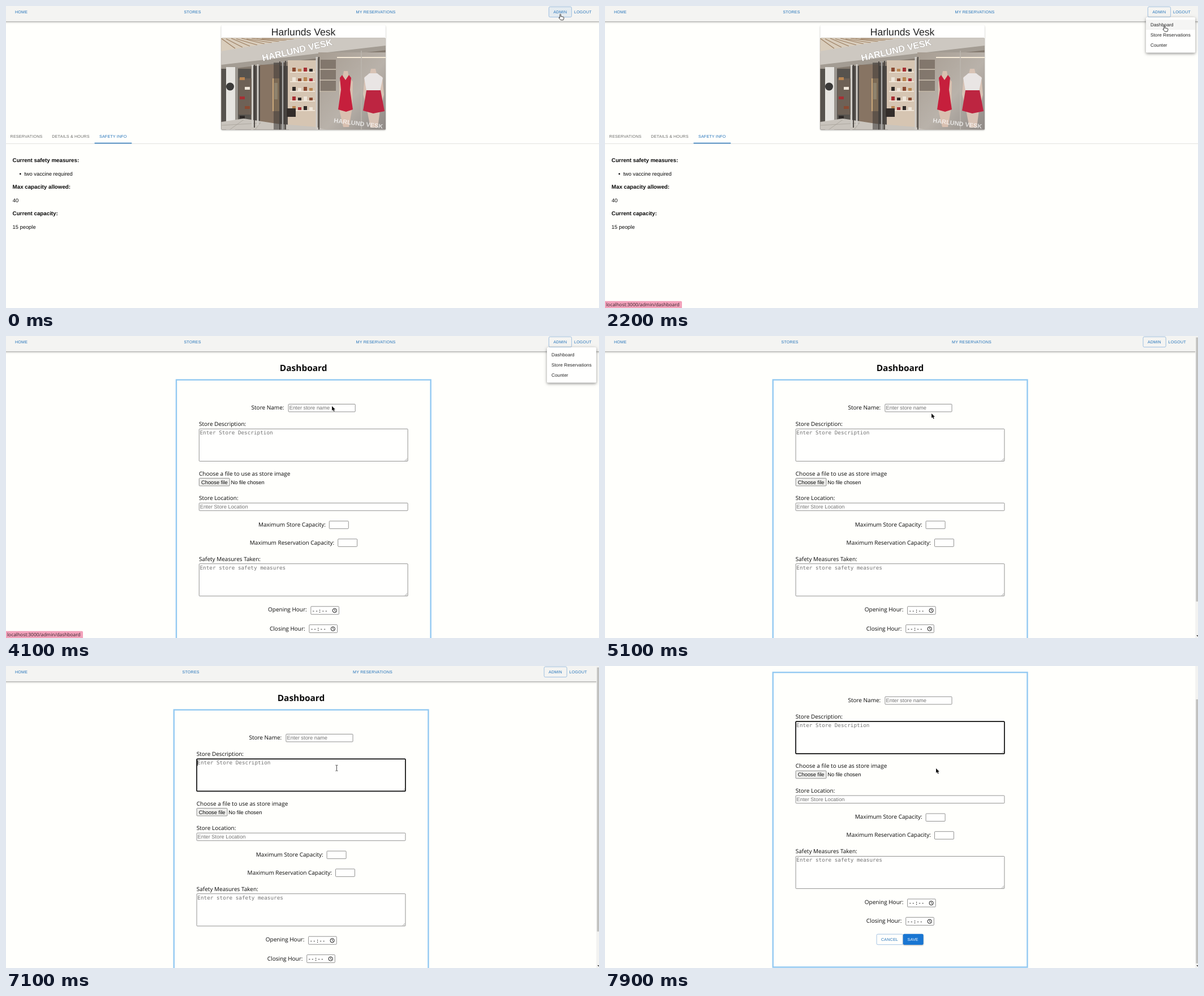
Animation, 1048 px wide and 534 px high, one loop 8000 ms. Source, as an HTML page:

```html
<!DOCTYPE html>
<html lang="en">
<head>
<meta charset="utf-8">
<title>Store admin</title>
<style>
  html, body { margin: 0; width: 100%; height: 100%; overflow: hidden; background: #fffffc; }
  svg { display: block; width: 1048px; height: 534px; }
  text { font-family: "Liberation Sans", Arial, sans-serif; text-rendering: geometricPrecision; white-space: pre; fill: #0a0a0a; }
  .btn { font-size: 7.1px; letter-spacing: .2px; fill: #2272b9; }
  .tab { fill: #6a6a68; }
  .white { fill: #fff; }
  .title { font-size: 17.6px; fill: #222; }
  .bold { font-size: 9.75px; font-weight: 700; }
  .body { font-size: 9.33px; }
  .menu { font-size: 8.19px; letter-spacing: .077px; fill: #222; }
  .head { font: 700 15.45px "Open Sans", "Noto Sans", sans-serif; }
  .label { font: 10px "Open Sans", "Noto Sans", sans-serif; }
  .status { font: 8.4px "Open Sans", "Noto Sans", sans-serif; fill: #33242a; }
  .mono { font: 9.33px "DejaVu Sans Mono", monospace; }
  .hint { fill: #757575; }
  .sign { font-size: 16px; font-weight: 700; fill: #fff; }
  .field { fill: #fffffe; stroke: #767676; stroke-width: .8px; }
  .hover { stroke: #444; }
  .focus { stroke: #0c0c0c; stroke-width: 1.7px; }
  .outline { fill: none; stroke: #8cb4dc; stroke-width: .8px; }
  .nav { filter: drop-shadow(0 1px 1px rgba(0,0,0,.28)) drop-shadow(0 1px 2px rgba(0,0,0,.18)); }
  .card { filter: drop-shadow(0 1px .8px rgba(0,0,0,.3)); }
  .paper { filter: drop-shadow(0 2px 2px rgba(0,0,0,.28)) drop-shadow(0 1px 3px rgba(0,0,0,.18)); }
</style>
</head>
<body>
<svg id="stage" viewBox="0 0 1048 534"></svg>
<script>
const LOOP = 8000, STEP = 100, NARROW = 8.4;

const text = (x, y, s, cls, extra = '') =>
  `<text x="${x}" y="${y}" class="${cls}" ${extra}>${s.replace('&', '&amp;')}</text>`;
const rect = (x, y, x2, y2, attrs) =>
  `<rect x="${x}" y="${y}" width="${x2 - x}" height="${y2 - y}" ${attrs}/>`;
const fill = c => `fill="${c}"`;
const poly = (points, c) => `<polygon points="${points}" fill="${c}"/>`;
const line = (d, c, w) => `<path d="${d}" fill="none" stroke="${c}" stroke-width="${w}"/>`;
const group = (id, body, attrs = '') => `<g id="${id}" ${attrs}>${body}</g>`;
const field = (x, y, x2, y2, id = '') =>
  rect(x, y, x2, y2, `rx="1.1" class="field" ${id && `id="${id}"`}`);

// Navigation links; the last number tells how far each follows the right edge.
function navLinks(shrink) {
  const links = [['HOME', 16, 0], ['STORES', 314.4, .34], ['MY RESERVATIONS', 618.6, .66],
    ['ADMIN', 967.4, 1], ['LOGOUT', 1004, 1]];
  return rect(959.4 - shrink, 1.4, 999.6 - shrink, 19.6, 'rx="2.2" class="outline"') +
    links.map(([s, x, k]) => text(x - k * shrink, 13.1, s, 'btn')).join('');
}

function photo() {
  let s = rect(380, 56, 671, 219, fill('#857b70'));
  s += poly('380,56 540,56 380,84', '#d9cdbc');
  for (let i = 0; i < 9; i++)
    s += line(`M${380 + i * 9} ${57 + i % 2}L${405 + i * 13} ${75 - i * 2}`, '#9a7d60', 1.1);
  s += poly('380,80 525,56 671,56 671,74 380,109', '#cdc8c1');
  s += poly('380,104 671,70 671,78 380,113', '#a39c93');

  // entrance
  s += rect(380, 111, 433, 219, fill('#57534e'));
  s += rect(389, 108, 405, 219, fill('#e6e4e0'));
  s += rect(405, 108, 410, 219, fill('#9b968f'));
  s += '<circle cx="396" cy="142.500" r="7" fill="#3b3a39"/>';
  s += rect(411, 128, 435, 192, fill('#6e6156'));
  s += rect(437, 106, 500, 219, fill('#4f4a46'));
  s += rect(449, 104, 483, 208, fill('#877463'));
  s += rect(471, 128, 484, 186, fill('#cba87b'));
  s += rect(474, 136, 480, 165, fill('#f2dcb0'));

  // shelves
  s += rect(498, 96, 548, 216, fill('#d6c5b2'));
  s += rect(560, 86, 588, 150, fill('#a0927f'));
  const goods = ['#8a4a32', '#2f2a28', '#b98552', '#efe6da', '#a62f33'];
  for (let r = 0; r < 5; r++) {
    const y = 116 + r * 17;
    s += rect(502, y, 546, y + 1.5, fill('#f6ecdf'));
    for (let k = 0; k < 4; k++)
      s += rect(506 + k * 10, y - 7 + k % 2 * 2, 512 + k * 10, y, fill(goods[(r * 3 + k * 2) % 5]));
    s += rect(413 + r % 2 * 9, y + 10, 422 + r % 2 * 9, y + 15, fill(goods[(r + 2) % 5]));
  }
  s += rect(496, 181, 512, 196, fill('#332d2a'));

  // window
  s += rect(552, 82, 671, 219, 'fill="url(#glass)"');
  s += rect(556, 95, 583, 152, 'fill="#74695e" opacity=".75"');
  s += line('M553 112H583M553 131H583M553 151H583', '#cfc3b4', 1.4);
  s += line('M585 91H671', '#f6ead6', 2);
  s += line('M628 79V219', '#bbb6ae', 1.5);

  // floor and doors
  s += poly('380,205 420,199 478,208 548,214 566,219 380,219', '#c9c4bd');
  s += line('M380 211L450 207M395 219L420 201M440 219L450 206', '#a8a29a', .8);
  s += rect(473, 100, 493, 219, 'fill="#3c3a38" opacity=".55"');
  s += line('M435.500 104V214M445 103V211M549 90V219', '#d0cdc8', 3);
  s += line('M439 104V215M484 98V219M494 97V219M553 90V219', '#46423f', 1.8);
  s += line('M489 98V219', '#aaa9a7', 2.4);

  // mannequins
  s += poly('597,115 604,115 606,125 613,134 612,180 606,214 601,214 596,214 589,183 589,134 595,125', '#d9c0b0');
  s += poly('594,122 600,131 606,122 610,127 608,148 613,183 601,187 587,183 592,148 590,127', '#c61f3c');
  s += poly('645,111 653,111 655,120 665,125 668,157 661,184 657,215 650,215 644,215 638,184 631,156 634,125 643,120', '#d8c3b5');
  s += poly('642,119 656,119 666,127 661,150 637,150 633,127', '#e9e5e4');
  s += poly('637,149 662,149 669,186 649,190 631,185', '#bd2541');

  // lettering
  s += text(454, 97.5, 'HARLUND VESK', 'sign', 'transform="rotate(-13 454 97.5)" stroke="#8f8a83" stroke-width=".5" paint-order="stroke" textLength=""');
  s += text(579, 206, 'HARLUND VESK', 'sign', 'transform="rotate(7 579 206)" style="font-size:11px" opacity=".7"');
  return s.replace(' textLength=""', '');
}

function storePage() {
  const rows = [['Current safety measures:', 'bold', 11.6, 276], ['two vaccine required', 'body', 32.2, 299.7],
    ['Max capacity allowed:', 'bold', 11.6, 323.2], ['40', 'body', 11.8, 347],
    ['Current capacity:', 'bold', 11.6, 370.4], ['15 people', 'body', 11.6, 394.4]];
  return rect(380.4, 34, 670.9, 218.7, 'rx="2" fill="#fffffe" class="card"') +
    text(525.6, 52.2, 'Harlunds Vesk', 'title', 'text-anchor="middle"') +
    `<g clip-path="url(#photoClip)">${photo()}</g>` +
    rect(0, 243, 1048, 243.8, fill('#dcdcda')) +
    rect(156.5, 241.8, 222.2, 243.2, fill('#2272b9')) +
    text(7.6, 233.1, 'RESERVATIONS', 'btn tab') +
    text(81.3, 233.1, 'DETAILS & HOURS', 'btn tab') +
    text(165, 233.1, 'SAFETY INFO', 'btn') +
    '<circle cx="25.3" cy="296.900" r="1.300"/>' +
    rows.map(([s, cls, x, y]) => text(x, y, s, cls)).join('');
}

const grip = (x, y) => line(`M${x - 5} ${y - .8}l4.2-4.2M${x - 2.600} ${y - .8}l1.800-1.800`, '#777', .6);

function timeField(x, y) {
  return field(x, y, x + 49.6, y + 14) + text(x + 1.8, y + 10.4, '--:--', 'mono') +
    `<circle cx="${x + 42}" cy="${y + 7.2}" r="3.600" fill="none" stroke="#111"/>` +
    line(`M${x + 42} ${y + 4.8}v2.600l1.800 1`, '#111', .8);
}

function dashboard() {
  const labels = [['Store Name:', 433.6, 130], ['Store Description:', 341, 159.4],
    ['Choose a file to use as store image', 341, 246.5], ['Store Location:', 341, 290.3],
    ['Maximum Store Capacity:', 446, 336.6], ['Maximum Reservation Capacity:', 430.8, 368.5],
    ['Safety Measures Taken:', 341, 397.5], ['Opening Hour:', 463, 487.4], ['Closing Hour:', 466, 520.6]];
  return text(525.7, 61.6, 'Dashboard', 'head', 'text-anchor="middle"') +
    rect(301, 77.5, 750.6, 598.7, 'fill="none" stroke="#93c9f2" stroke-width="2.4"') +
    labels.map(([s, x, y]) => text(x, y, s, 'label')).join('') +
    field(499.1, 120.5, 617.2, 134, 'nameBox') + text(500.7, 130.4, 'Enter store name', 'body hint') +
    field(341.3, 164.3, 710.1, 221.4, 'descBox') + grip(710, 221.4) +
    text(342.5, 174.2, 'Enter Store Description', 'mono hint') +
    rect(341.3, 251.5, 395.2, 265, 'rx="1.1" fill="#efefed" stroke="#767676" stroke-width=".8"') +
    text(345, 261.5, 'Choose file', 'body') + text(397.5, 261.5, 'No file chosen', 'body') +
    field(341.3, 295.3, 710.1, 308.8) + text(342.7, 305.3, 'Enter Store Location', 'body hint') +
    field(571.3, 327.2, 605.3, 340.7) + field(586.7, 358.9, 620.6, 372.4) +
    field(341.3, 402.7, 710.1, 459.8) + grip(710, 459.8) +
    text(342.5, 412.6, 'Enter store safety measures', 'mono hint') +
    timeField(538.8, 478.2) + timeField(535.9, 510.6) +
    rect(484.3, 540.4, 531, 558.9, 'rx="2.2" class="outline"') + text(492.2, 552.1, 'CANCEL', 'btn') +
    rect(531, 540, 566.9, 559.2, 'rx="2.2" fill="#1976d2" class="card"') + text(538.8, 552.1, 'SAVE', 'btn white') +
    rect(500.4, 122, 501.1, 132, 'id="nameCaret"') + rect(342.2, 166.5, 342.9, 176.5, 'id="descCaret"');
}

const menu = rect(956, 20, 1043.2, 82.6, 'rx="2.2" fill="#fffffe" class="paper"') +
  rect(956, 24.2, 1043.2, 42, 'id="row" fill="#2a2a20"') +
  text(964, 36, 'Dashboard', 'menu') + text(964, 53.8, 'Store Reservations', 'menu') + text(964, 72, 'Counter', 'menu');

const shapes = {
  hand: '<path d="M0 1.200C0-.2 1.800-.2 1.800 1.200V4.300L6 5Q7 5.300 7 6.300V8L6 10.600H1.600L-1.700 6.900Q-1.700 5.300 0 6.500Z" fill="#fff" stroke="#222" stroke-width=".9"/>',
  arrow: '<path d="M0 0V8L1.900 6.300 3.200 9.500 4.700 8.900 3.400 5.900 5.800 5.700Z" fill="#111" stroke="#fff" stroke-width=".7" paint-order="stroke"/>',
  beam: line('M-2-5h1.400l.6.500.6-.5H2M0-4.500V4.500M-2 5h1.400l.6-.5.6.5H2', '#333', .9)
};

document.getElementById('stage').innerHTML =
  `<defs><clipPath id="photoClip">${rect(380.4, 56.4, 670.9, 218.6, 'rx="1.500"')}</clipPath>
   <linearGradient id="glass" x2="1" y2="1"><stop stop-color="#a79d92"/><stop offset=".55" stop-color="#b9b2aa"/>
   <stop offset="1" stop-color="#8f8a86"/></linearGradient></defs>` +
  group('page',
    group('store', storePage()) + group('form', dashboard()) +
    rect(-10, -10, 1058, 27, 'fill="#f4f4f2" class="nav"') +
    rect(959.4, 1.4, 999.6, 19.6, 'id="tint" rx="2.2" fill="#1976d2"') +
    group('wide', navLinks(0)) + group('narrow', navLinks(NARROW))) +
  group('menu', menu) +
  group('status', '<path d="M0 521.800H134Q136 521.800 136 523.800V534H0Z" fill="#f2a1ba"/>' +
    text(2, 531, 'localhost:3000/admin/dashboard', 'status')) +
  group('bar', rect(1043.2, 0, 1048, 534, fill('#f3f3f1')) +
    rect(1044.4, 2.5, 1050, 469.5, 'id="thumb" fill="#c1c1bf"') + poly('1045,529 1049.4,529 1047.2,531.6', '#505050')) +
  Object.entries(shapes).map(([id, s]) => group(id, s)).join('');

// Pointer moves: start, end, x, y
const moves = [[800, 1200, 987.8, 34.6], [3300, 3500, 606, 131], [3700, 3900, 575, 124], [4000, 4100, 576, 124],
  [4800, 5100, 577, 137], [5100, 5200, 579, 127], [5200, 5300, 579, 127.8], [5900, 6100, 584.4, 180.4], [7600, 7700, 585, 181]];
// Pointer looks: from, shape
const looks = [[0, 'hand'], [800, 'arrow'], [1100, 'hand'], [3400, 'arrow'], [5200, 'beam'],
  [6000, 'arrow'], [6100, 'beam'], [7700, 'arrow']];

const $ = id => document.getElementById(id);
const clamp = v => Math.min(1, Math.max(0, v));
const within = (t, a, b) => t >= a && t < b;
const ease = p => p * p * (3 - 2 * p);
const show = (id, on) => $(id).setAttribute('visibility', on ? 'visible' : 'hidden');
const set = (id, key, v) => $(id).setAttribute(key, v);

function pose(t) {
  const narrow = t >= 4700;
  show('store', t < 2300);
  show('form', t >= 2400);
  set('form', 'transform', `translate(${narrow ? -NARROW / 2 : 0} 0)`);
  show('wide', !narrow);
  show('narrow', narrow);
  show('bar', narrow);
  show('status', within(t, 1200, 4700));
  set('tint', 'opacity', t < 600 ? .07 : .16 * clamp((1000 - t) / 400));

  const scroll = ease(clamp((t - 7600) / 300));
  set('page', 'transform', `translate(0 ${-66.2 * scroll})`);
  set('thumb', 'y', 2.5 + 56.4 * scroll);

  const open = ease(clamp((t - 600) / 300)), close = clamp((t - 4400) / 300);
  show('menu', open > 0 && close < 1);
  set('menu', 'opacity', open * (1 - close));
  const sx = .75 + .25 * open, sy = .56 + .44 * open;
  set('menu', 'transform', `translate(${980 * (1 - sx)} ${20 * (1 - sy)}) scale(${sx} ${sy})`);
  set('row', 'opacity', within(t, 1200, 3400) ? .045 + .045 * clamp((t - 2200) / 300) : 0);

  const nameFocus = within(t, 5500, 7100), descFocus = t >= 7100;
  set('nameBox', 'class', 'field' + (nameFocus ? ' focus' : within(t, 5200, 5500) ? ' hover' : ''));
  set('descBox', 'class', 'field' + (descFocus ? ' focus' : t >= 6100 ? ' hover' : ''));
  show('nameCaret', nameFocus && !within(t, 6200, 6700));
  show('descCaret', within(t, 7100, 7700));

  let x = 978.8, y = 14.2;
  for (const [a, b, tx, ty] of moves) {
    const p = clamp((t - a) / (b - a));
    x += (tx - x) * p;
    y += (ty - y) * p;
  }
  const look = looks.filter(([from]) => t >= from).pop()[1];
  for (const id in shapes) show(id, id === look);
  set(look, 'transform', `translate(${x} ${y})`);
}

const start = performance.now();
function tick() {
  const t = (performance.now() - start) % LOOP;
  pose(Math.floor(t / STEP) * STEP);
  requestAnimationFrame(tick);
}
tick();
</script>
</body>
</html>
```
